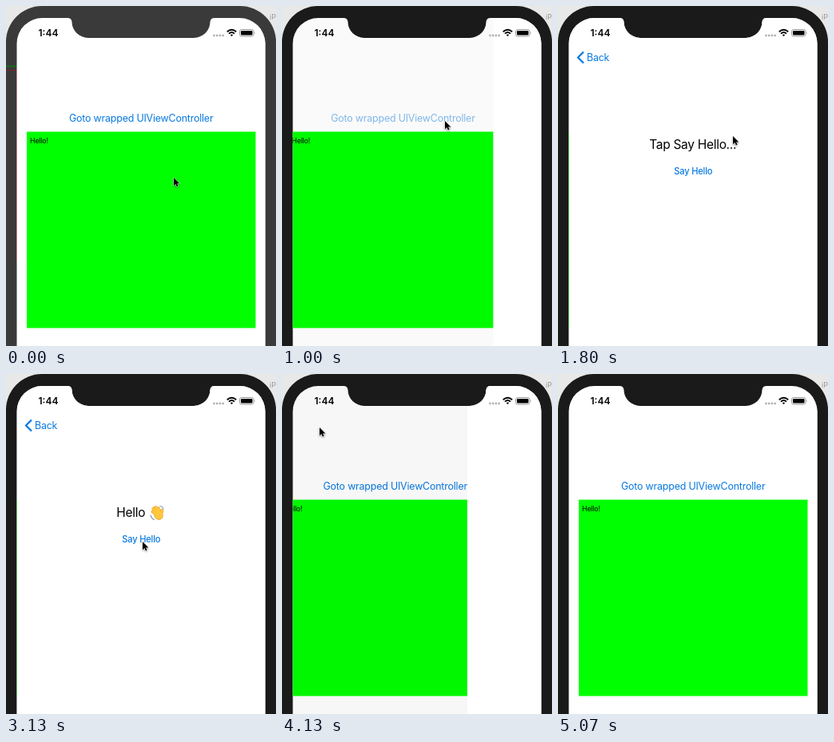
Write an HTML page that moves like this. It is 338x426 px and loops after 5.33 s.

```html
<!DOCTYPE html>
<html lang="en">
<head>
<meta charset="utf-8">
<style>
  html, body { margin: 0; width: 100%; height: 100%; overflow: hidden; background: #e8e8e8; }
  svg { display: block; width: 338px; height: 426px; font: 12.4px Inter, "Liberation Sans", sans-serif; }
  .body { letter-spacing: -.18px; }
  .title { font-size: 15.5px; letter-spacing: -.3px; }
  .link { fill: #0879e0; }
  .mid { text-anchor: middle; }
</style>
</head>
<body>
<svg viewBox="0 0 338 426">
  <defs>
    <clipPath id="screen">
      <path d="M13.5 430V47A32 32 0 0 1 45.5 15H77Q82 15 82.5 20A21 20 0 0 0 103 40H235A21 20 0 0 0 255.5 20Q256 15 261 15H292.5A32 32 0 0 1 324.5 47V430Z"/>
    </clipPath>
  </defs>

  <rect width="338" height="426" fill="#e8e8e8"/>
  <text x="330" y="17" font-size="9" fill="#999">iP</text>
  <rect id="bezel" width="338" height="500" rx="45"/>
  <g id="behind" fill="none">
    <path d="M0 75.5H14" stroke="#176b1a" stroke-width="2"/>
    <path d="M0 80.5H13.5V318" stroke="#85202a"/>
  </g>

  <g clip-path="url(#screen)">
    <rect x="13" y="15" width="312" height="411" fill="#fff"/>
    <g id="home">
      <text id="goto" class="body link mid" x="169.2" y="145">Goto wrapped UIViewController</text>
      <rect x="26" y="157.5" width="286.5" height="246" fill="#0f0"/>
      <text x="30" y="172" font-size="8.8" letter-spacing="-.15">Hello!</text>
    </g>
    <rect id="dim" x="13" y="15" width="312" height="411"/>

    <g id="detail">
      <rect x="13.5" y="15" width="312" height="411" fill="#fff"/>
      <text id="prompt" class="title mid" x="168.7" y="179.2">Tap Say Hello...</text>
      <g id="greeting">
        <text class="title" x="138.3" y="179.2">Hello</text>
        <g fill="none" stroke-linecap="round">
          <g stroke="#e59a2b" stroke-width="3.8">
            <path id="hand" d="M190 177L183.5 172.5M190 175L184.3 168.8M191.5 174L187 167M193 174L190.5 168M194 177L195.5 171"/>
          </g>
          <ellipse cx="191" cy="177" rx="5" ry="5.6" fill="#ffc83d" stroke="#e59a2b" stroke-width=".8" transform="rotate(-35 191 177)"/>
          <use href="#hand" stroke="#ffc83d" stroke-width="2.7"/>
          <path d="M193 165.5Q196 166 197 169M181 177Q182 181 185.5 182.5" stroke="#8aa0ad" stroke-width="1.1"/>
        </g>
      </g>
      <text id="say" class="link mid" x="169.3" y="211" font-size="11.1" font-weight="500" letter-spacing="-.2">Say Hello</text>
    </g>

    <g id="back">
      <path id="chevron" d="M32 57.5L25 64.5L32 71.5" fill="none" stroke="#0879e0" stroke-width="2.2"/>
      <text id="label" class="body link" x="36" y="69">Back</text>
    </g>

    <text x="40.5" y="38" font-size="12" font-weight="600">1:44</text>
    <path d="M260.5 37H273" stroke="#b4b4b4" stroke-width="2.8" stroke-linecap="round" stroke-dasharray="0 3.7"/>
    <g fill="none" stroke="#000" stroke-width="1.9">
      <path d="M276.8 32.2Q282.5 27.2 288.2 32.2M279 34.6Q282.5 31.6 286 34.6"/>
      <path d="M280.7 36.1Q282.5 34.8 284.3 36.1L282.5 38Z" fill="#000" stroke="none"/>
    </g>
    <rect x="292.5" y="29.5" width="17.5" height="8.5" rx="2.4" fill="none" stroke="#999"/>
    <rect x="294" y="31" width="14.5" height="5.5" rx="1.2"/>
    <path d="M311.3 32.3Q312.8 33.7 311.3 35.2Z" fill="#999"/>
  </g>

  <g id="cursor" style="filter:drop-shadow(0 1px 1px #0006)">
    <path d="M0 0V12.5L2.9 9.8L4.8 14L6.8 13.2L5 9.2H9Z" transform="translate(0 1) scale(.82)"
      stroke="#fff" stroke-width="1.2" paint-order="stroke"/>
  </g>
</svg>
<script>
const LOOP = 5330, STEP = LOOP / 80, WIDTH = 310;
const PUSH = 955, POP = 3994;
// Pointer tip: time, x, y
const PATH = [
  [70, 210, 214], [600, 205, 149], [800, 204, 143], [1300, 204, 143], [1800, 219, 162],
  [2400, 169, 203], [2530, 171, 209], [3200, 171, 209], [3800, 45, 68], [3870, 47, 66],
  [4250, 47, 66], [4530, 46, 85]
];
const $ = id => document.getElementById(id);
const clamp = v => Math.max(0, Math.min(1, v));
const ramp = (t, a, b) => clamp((t - a) / (b - a));
const smooth = v => v * v * (3 - 2 * v);
const move = (id, x, y = 0) => $(id).setAttribute('transform', `translate(${x} ${y})`);
const fade = (id, v) => $(id).setAttribute('opacity', v);

// Critically damped spring from 0 to 1
function spring(ms) {
  const w = 18 * Math.max(0, ms) / 1000;
  return 1 - (1 + w) * Math.exp(-w);
}

function pointer(t) {
  const i = PATH.findIndex(p => p[0] > t);
  if (i < 0) return PATH.at(-1).slice(1);
  if (i === 0) return PATH[0].slice(1);
  const [a, b] = [PATH[i - 1], PATH[i]];
  const k = smooth(ramp(t, a[0], b[0]));
  return [a[1] + (b[1] - a[1]) * k, a[2] + (b[2] - a[2]) * k];
}

function draw(t) {
  const cover = t < POP ? spring(t - PUSH) : 1 - spring(t - POP);
  const active = t >= 790;
  $('bezel').setAttribute('fill', active ? '#1a1a1a' : '#3a3a3a');
  fade('behind', active ? 0 : 1);

  move('home', -0.3 * WIDTH * cover);
  fade('dim', 0.1 * cover);
  move('detail', WIDTH * (1 - cover));
  fade('goto', t < 860 || t > 1200 ? 1 : 0.5 + 0.5 * ramp(t, 1000, 1190));
  fade('say', t > 2720 && t < 2860 ? 0.4 : 1);

  const greeted = t >= 2860;
  fade('prompt', greeted ? 0 : 1);
  fade('greeting', greeted ? 1 : 0);

  const lag = (1 - cover) / 0.07;
  move('back', 0, 2 * lag);
  fade('back', ramp(cover, 0.5, 0.95) * (t > 3870 && t < POP ? 0.4 : 1));
  move('chevron', 4 * lag);
  fade('chevron', ramp(cover, 0.87, 1));
  move('label', -1.5 * lag);

  move('cursor', ...pointer(t));
  fade('cursor', 1 - ramp(t, 4800, 5060));
}

function tick() {
  const t = performance.now() % LOOP;
  draw(Math.floor((t + 5) / STEP) % 80 * STEP);
  requestAnimationFrame(tick);
}
tick();
</script>
</body>
</html>
```
